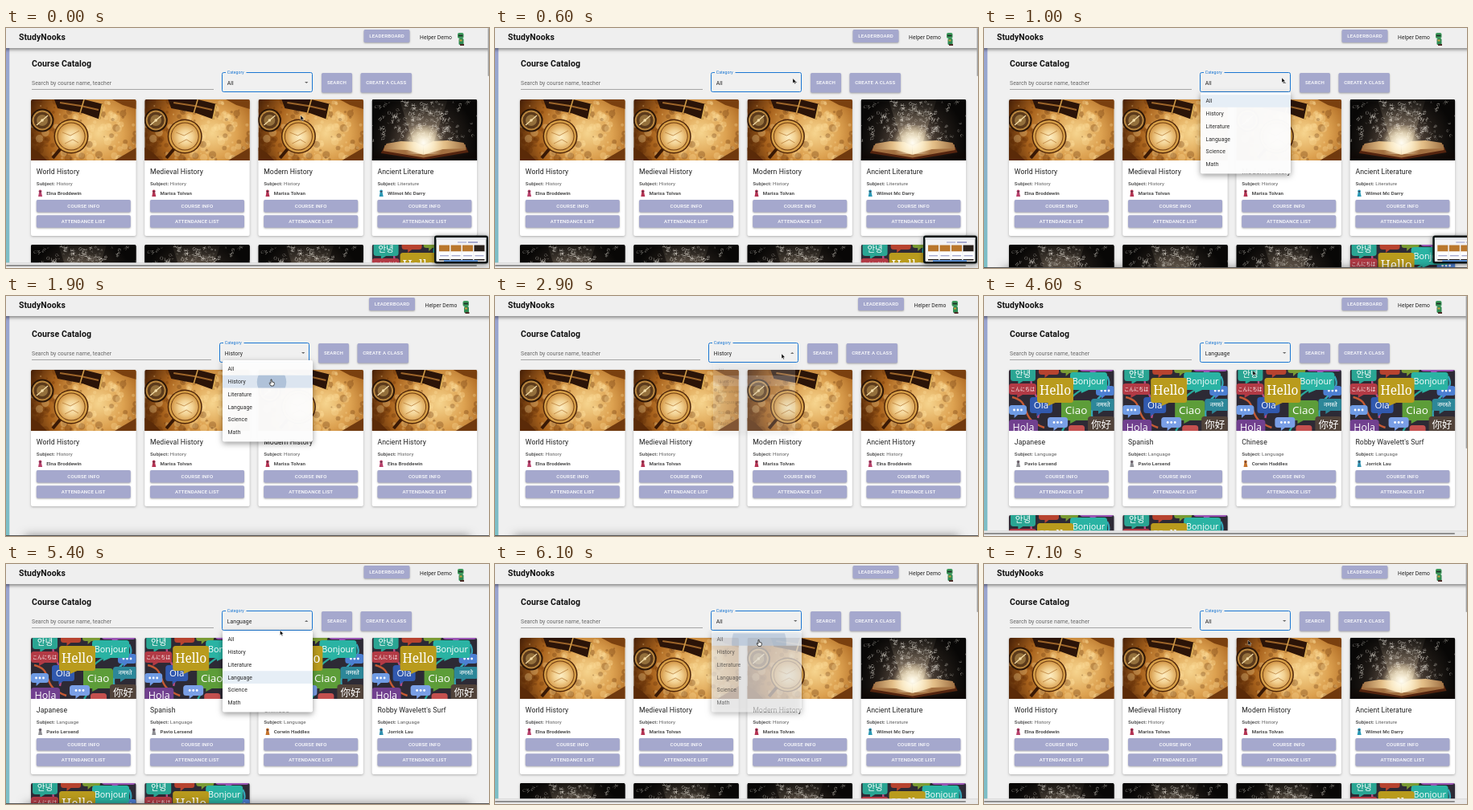
Recreate the animation shown at these times as an HTML page with a canvas. Size 600 by 299 pixels, loop 7200 ms.

```html
<!DOCTYPE html>
<html lang="en">
<head>
<meta charset="utf-8">
<title>Course Catalog</title>
<style>
  html, body { margin: 0; width: 600px; height: 299px; overflow: hidden; background: #f0f0f0; }
  canvas { display: block; width: 600px; height: 299px; }
</style>
</head>
<body>
<canvas id="stage"></canvas>
<script>
const LOOP = 7200, W = 600, H = 299;
const BLUE = '#1976d2', LILAC = '#a5a8cd', PAGE = '#f0f0f0';
const canvas = document.getElementById('stage');
const dpr = window.devicePixelRatio || 1;
canvas.width = W * dpr;
canvas.height = H * dpr;
const c = canvas.getContext('2d');

const CATEGORIES = ['All', 'History', 'Literature', 'Language', 'Science', 'Math'];
const elna = ['Elna Broddewin', '#b8406a'], marisa = ['Marisa Tolvan', '#b43252'];
const wilmot = ['Wilmot Mc Darry', '#2a98b4'], pavio = ['Pavio Lersend', '#8d8d92'];
const corwin = ['Corwin Haddles', '#c4722c'], jorrick = ['Jorrick Lau', '#2f8fae'];
const historyRow = [['World History', 'History', elna], ['Medieval History', 'History', marisa],
  ['Modern History', 'History', marisa]];
const COURSES = {
  All: [...historyRow, ['Ancient Literature', 'Literature', wilmot],
    ['', 'Literature'], ['', 'Literature'], ['', 'Literature'], ['', 'Language']],
  History: [...historyRow, ['Ancient History', 'History', elna]],
  Language: [['Japanese', 'Language', pavio], ['Spanish', 'Language', pavio],
    ['Chinese', 'Language', corwin], ["Robby Wavelett's Surf", 'Language', jorrick],
    ['', 'Language'], ['', 'Language']]
};
const MENUS = [
  { open: 755, click: 1850, x: 269, y: 80 },
  { open: 2800, click: 3800, x: 266, y: 83 },
  { open: 4950, click: 5985, x: 269, y: 83 }
];
// time, x, y
const POINTER = [[0, 366, 109], [650, 370, 62], [1050, 370, 62], [1600, 330, 107], [2150, 330, 107],
  [2700, 356, 72], [3000, 356, 72], [3600, 329, 141], [4000, 329, 141], [4600, 334, 93],
  [4850, 350, 71], [5150, 350, 71], [5700, 328, 98], [7200, 328, 95]];

const clamp = v => Math.max(0, Math.min(1, v));
const hash = n => { const v = Math.sin(n * 127.1) * 43758.5453; return v - Math.floor(v); };

function text(s, x, y, size, { color = '#222', weight = 400, align = 'left', space = .01, font = 'Roboto, sans-serif' } = {}) {
  c.font = `${weight} ${size}px ${font}`;
  c.letterSpacing = space * size + 'px';
  c.textAlign = align;
  c.fillStyle = color;
  c.fillText(s, x, y + size * .36);
  return c.measureText(s).width;
}
function rect(x, y, w, h, fill, r = 0) {
  c.fillStyle = fill;
  c.beginPath();
  c.roundRect(x, y, w, h, r);
  c.fill();
}
function disc(x, y, r, fill) {
  c.fillStyle = fill;
  c.beginPath();
  c.arc(x, y, r, 0, 7);
  c.fill();
}
function line(points, color, width) {
  c.strokeStyle = color;
  c.lineWidth = width;
  c.beginPath();
  points.forEach(p => c.lineTo(...p));
  c.stroke();
}
function poly(points, fill) {
  c.fillStyle = fill;
  c.beginPath();
  points.forEach(p => c.lineTo(...p));
  c.fill();
}
function shaded(blur, dy, alpha, draw) {
  c.save();
  c.shadowColor = `rgba(0,0,0,${alpha})`;
  c.shadowBlur = blur * dpr;
  c.shadowOffsetY = dy * dpr;
  draw();
  c.restore();
}
function glow(x, y, r, ...colors) {
  const g = c.createRadialGradient(x, y, 0, x, y, r);
  colors.forEach((color, i) => g.addColorStop(i / (colors.length - 1), color));
  return g;
}
function fade(y0, y1, a, b) {
  const g = c.createLinearGradient(0, y0, 0, y1);
  g.addColorStop(0, a);
  g.addColorStop(1, b);
  return g;
}
function button(label, x, y, w, h) {
  shaded(2, 1, .3, () => rect(x, y, w, h, LILAC, 1.7));
  text(label, x + w / 2, y + h / 2, 6.1, { color: '#fff', weight: 500, align: 'center', space: .025 });
}

const PICTURES = {
  History() {
    rect(0, 0, 131, 76, glow(84, 42, 92, '#f6d48e', '#dda251', '#a8621c', '#4a2207'));
    c.globalAlpha = .28;
    for (let i = 0; i < 190; i++) {
      const x = hash(i) * 131, y = hash(i + 260) * 76;
      const edge = Math.hypot((x - 84) / 84, (y - 42) / 50);
      disc(x, y, 1 + hash(i + 520) * 4, hash(i + 780) < edge * .75 ? '#5a2907' : '#ffe0a0');
    }
    c.globalAlpha = 1;
    poly([[0, 60], [10, 66], [20, 76], [0, 76]], '#5a2a08');
    poly([[101, 0], [131, 0], [131, 12], [114, 7]], '#7a400f');
    poly([[131, 60], [131, 76], [104, 76]], '#70390e');

    poly([[29, 0], [66, 0], [90, 6], [86, 25], [64, 17], [33, 11]], '#2b1408');
    line([[36, 4], [62, 8], [84, 13]], '#9c642a', 2);
    line([[66, 0], [61, 17]], '#cf9a48', 1.6);
    line([[89, 6], [85, 25]], '#d9a954', 2.4);

    disc(14, 26, 14.5, '#2b1506');
    disc(14, 26, 12.5, '#b8863f');
    disc(14, 26, 10.5, '#5b3a1b');
    disc(14, 26, 7, '#94703c');
    line([[7, 32], [21, 20]], '#f3dba6', 1.3);
    disc(14, 26, 1.8, '#f3dba6');

    line([[37, 61], [27, 73]], '#381805', 4);
    disc(50, 46, 21.5, '#4d2408');
    disc(50, 46, 20, '#d8a048');
    disc(50, 46, 17.5, '#6e3b10');
    disc(50, 46, 16.6, glow(51, 47, 17, '#fdeec4', '#f3d293', '#d69c4c'));
    line([[39, 41], [49, 45], [60, 39]], '#b97f3b', .8);
    line([[42, 55], [52, 50], [59, 54]], '#b97f3b', .8);
  },
  Literature() {
    rect(0, 0, 131, 76, '#080706');
    rect(0, 0, 131, 76, glow(64, 54, 66, '#d9c19a', '#51443a', '#1e1915', '#080706'));
    poly([[52, 56], [34, 0], [94, 0], [76, 56]], fade(0, 56, 'rgba(200,185,160,.04)', 'rgba(255,235,200,.4)'));
    for (let i = 0; i < 230; i++) {
      const y = 2 + hash(i + 250) * 50, spread = .4 + hash(i + 500) * .6;
      c.save();
      c.translate(65 + (hash(i) - .5) * 140 * spread, y);
      c.rotate(hash(i + 750) * 6);
      c.globalAlpha = .3 + hash(i + 1000) * .6;
      text(String.fromCharCode(65 + i % 26), 0, 0, 3 + hash(i + 1250) * 3.5,
        { color: '#fbf6ec', align: 'center', font: 'Liberation Serif, serif' });
      c.restore();
    }
    rect(0, 62, 131, 14, fade(62, 76, 'rgba(20,10,5,.1)', '#0c0604'));
    poly([[15, 60], [64, 70], [117, 59], [120, 66], [65, 75], [11, 67]], '#54240f');
    poly([[16, 57], [40, 59], [64, 68], [90, 58], [116, 56], [117, 63], [64, 72.5], [14, 64]], '#a26f40');
    poly([[18, 55], [36, 52], [54, 53], [64, 58], [64, 69], [44, 63], [15, 62]], glow(64, 58, 50, '#fff3d4', '#e2bd86', '#9a6c40'));
    poly([[114, 54], [94, 51], [76, 52], [64, 58], [64, 69], [88, 62], [117, 61]], glow(64, 58, 54, '#fff3d4', '#e2bd86', '#9a6c40'));
    rect(36, 32, 56, 36, glow(64, 54, 25, '#fffdf4', 'rgba(255,244,214,.6)', 'rgba(255,230,180,0)'));
  },
  Language() {
    rect(0, 0, 131, 76, '#2d2a35');
    c.lineWidth = 2.4;
    [['#2aa79b', 92, 24, 60, 40, 80, 60, 66, 76], ['#b24c86', 30, 0, 20, 30, 44, 28, 36, 60],
      ['#35a5b8', 122, 8, 134, 30, 96, 32, 104, 62], ['#c55a34', 4, 34, 30, 40, 10, 60, 44, 72]].forEach(([color, x, y, ...rest]) => {
      c.strokeStyle = color;
      c.beginPath();
      c.moveTo(x, y);
      c.bezierCurveTo(...rest);
      c.stroke();
    });
    const cjk = 'Noto Sans CJK JP, Noto Sans CJK, sans-serif', sans = 'Open Sans, sans-serif';
    const bubble = (x, y, w, h, fill, word, size, font = sans) => {
      rect(x, y, w, h, fill, 3.5);
      poly([[x + w * .3, y + h - 1], [x + w * .55, y + h - 1], [x + w * .3, y + h + 4]], fill);
      if (word) text(word, x + w / 2, y + h / 2, size, { color: '#fff', align: 'center', space: 0, font });
      else for (let i = -1; i < 2; i++) disc(x + w / 2 + i * 4.5, y + h / 2, 1.4, '#fff');
    };
    bubble(37, -7, 25, 13, '#b7432f', ' ', 5);
    bubble(64, -8, 22, 12, '#7a9b34', ' ', 5);
    bubble(88, -9, 42, 11, '#9a56b4', ' ', 5);
    bubble(2, -3, 31, 17, '#2aa593', '안녕', 10.5, cjk);
    bubble(0, 17, 34, 14, '#b23a45', 'こんにちは', 6, cjk);
    bubble(108, 20, 23, 12, '#4c7fd2');
    bubble(102, 36, 30, 15, '#2d8799', 'नमस्ते', 8, 'Noto Sans Devanagari, Noto Sans, sans-serif');
    bubble(26, 34, 28, 20, '#3159ae', 'Olá', 11.5);
    bubble(0, 44, 22, 12, '#6f9be4');
    bubble(76, 3, 46, 22, '#2ab3a3', 'Bonjour', 10.8);
    bubble(65, 38, 37, 25, '#5d9d39', 'Ciao', 13.5);
    bubble(35, 10, 45, 31, '#b99b1d', 'Hello', 15.5, 'Noto Serif, serif');
    bubble(48, 59, 25, 13, '#7a9fe6');
    bubble(74, 69, 20, 12, '#c4504f', ' ', 5);
    bubble(0, 62, 36, 19, '#71408f', 'Hola', 12.5);
    bubble(98, 58, 33, 21, '#51433a', '你好', 12.5, cjk);
  }
};

function figure(x, y, color) {
  poly([[x - 2.4, y + 4.5], [x - 1.5, y - .5], [x + 1.5, y - .5], [x + 2.6, y + 4.5]], color);
  disc(x, y - 2, 1.9, color);
  rect(x - .9, y - 2.4, 1.9, 1.4, '#4a3040');
}

function card([title, subject, tutor], x, y) {
  shaded(3, 1, .28, () => rect(x, y, 130.5, 170, '#fff', 2));
  c.save();
  c.beginPath();
  c.roundRect(x, y, 130.5, 76, [2, 2, 0, 0]);
  c.clip();
  c.translate(x, y);
  PICTURES[subject]();
  c.restore();
  if (!tutor) return;
  const left = x + 6.8, grey = '#5c5c5c';
  text(title, left, y + 90, 8.7);
  const w = text('Subject: ', left, y + 104.3, 6.2, { weight: 700, color: grey });
  text(subject, left + w, y + 104.3, 6.2, { color: grey });
  figure(x + 11.5, y + 116.5, tutor[1]);
  text(tutor[0], x + 19.3, y + 116.7, 6.15, { weight: 700, color: '#4c4c4c' });
  button('COURSE INFO', x + 6.8, y + 125, 117, 15.5);
  button('ATTENDANCE LIST', x + 6.8, y + 144.3, 117, 15.5);
}

function toolbar(category, open, wide, y) {
  const x = wide ? 266 : 269, w = wide ? 111 : 112, shift = wide ? -4 : 0;
  text('Course Catalog', 32, y + 47.5, 10.5, { weight: 700, color: '#111' });
  text('Search by course name, teacher', 32, y + 72, 6.85, { color: '#666' });
  rect(32, y + 79, (wide ? 255 : 258) - 32, .7, '#8c8c8c');
  c.strokeStyle = BLUE;
  c.lineWidth = 1;
  c.beginPath();
  c.roundRect(x - .5, y + 58.5, w, 24, 2);
  c.stroke();
  rect(x + 4, y + 57, 25.5, 3, PAGE);
  text('Category', x + 5.8, y + 58.5, 5.15, { color: BLUE });
  text(category, x + 5.8, y + 71.2, 6.85);
  const ax = x + w - 7.8, ay = y + 71, d = open ? -1.1 : 1.1;
  poly([[ax - 2.2, ay - d], [ax + 2.2, ay - d], [ax, ay + d]], '#666');
  button('SEARCH', 392 + shift, y + 59, 38, 24.5);
  button('CREATE A CLASS', 440.5 + shift, y + 59, 63.5, 24.5);
}

function header(wide) {
  const shift = wide ? 6.5 : 0;
  shaded(4, 1.5, .45, () => rect(-9, -9, 618, 34, '#efefef'));
  text('StudyNooks', 16, 11.5, 10.4, { weight: 700, color: '#111' });
  button('LEADERBOARD', 444.5 + shift, 2, 57, 16);
  text('Helper Demo', 514 + shift, 11.5, 6.75);
  const x = 565 + shift;
  rect(x - 2.5, 13, 6, 8, '#2f8a52', 1.5);
  rect(x - 4, 6, 7.5, 7, '#3d9a5c', 2);
  rect(x - 3, 8.5, 5.5, 2, '#20352a');
  rect(x - 1.5, 14.5, 3, 2, '#c9a03d');
  rect(x - 1, 20, 5, 2, '#4b2b26');
}

function scrollbars(category) {
  rect(0, 292.5, W, 6.5, '#e9e9e9');
  rect(0, 292.5, W, .7, '#cfcfcf');
  rect(0, 295, 585, 2, '#8f8f8f', 1);
  rect(598.6, 0, 1.4, category === 'All' ? 60 : 190, '#a0a0a0', .7);
}

function bottomShade() {
  c.save();
  c.beginPath();
  c.rect(0, 270, W, 29);
  c.clip();
  shaded(12, 0, .4, () => rect(24, 298, 552, 20, '#777'));
  c.restore();
  rect(0, 297.9, W, 1.1, '#555');
}

function menuAlpha(m, t) {
  if (t < m.open) return 0;
  const leaving = t - m.click - 45;
  return leaving > 0 ? 1 - clamp(leaving / 200) : clamp((t - m.open) / 250) ** 2;
}

function drawMenu(m, t, category, pointer) {
  const leave = clamp((t - m.click - 110) / 135);
  const grow = (1 - (1 - clamp((t - m.open) / 250)) ** 2) * (1 - leave * leave);
  const rowH = 15.7, rowY = i => m.y + 11 + rowH * (i - .5);
  c.save();
  c.globalAlpha = menuAlpha(m, t);
  c.translate(m.x + 56, m.y);
  c.scale(.75 + .25 * grow, .5625 + .4375 * grow);
  c.translate(-m.x - 56, -m.y);
  shaded(7, 2.5, .4, () => rect(m.x, m.y, 112, 101.5, '#fff', 2));
  CATEGORIES.forEach((name, i) => {
    const hovered = Math.abs(pointer.y - rowY(i + .5)) < rowH / 2;
    if (name === category) rect(m.x, rowY(i), 112, rowH, hovered ? '#dbe5f0' : '#e6eef6');
    else if (hovered) rect(m.x, rowY(i), 112, rowH, '#f3f3f3');
    if (hovered && t > m.click) {
      c.save();
      c.beginPath();
      c.rect(m.x, rowY(i), 112, rowH);
      c.clip();
      disc(pointer.x, pointer.y, 6 + (t - m.click) * .24, 'rgba(70,110,160,.3)');
      c.restore();
    }
    text(name, m.x + 6.5, rowY(i + .5), 6.85);
  });
  c.restore();
}

function thumbnail(t) {
  const x = 532 + 25 * (Math.max(0, t - 850) / 150) ** 2;
  if (x > 610) return;
  shaded(6, 1, .5, () => rect(x, 258.5, 67, 35, '#0b1414', 3));
  rect(x + 2.5, 261, 62, 30, '#f3f3f5', 1);
  rect(x + 2.5, 261, 62, 2.5, '#dcdee2');
  rect(x + 29, 266, 11, 2, '#c3c6e0');
  rect(x + 42, 266, 12, 2, LILAC);
  for (let i = 0; i < 4; i++) {
    const left = x + 6 + i * 14.5;
    rect(left, 270.5, 13, 8, i < 3 ? '#b9772d' : '#2a211b');
    rect(left, 278.5, 13, 8, '#fff');
    rect(left + 1, 283, 11, 1.4, LILAC);
    rect(left, 288, 13, 1.5, '#26211f');
  }
  rect(x + 12, 289, 42, 2, '#5d8fd0');
}

function pointerAt(t) {
  const i = POINTER.findIndex(p => p[0] > t), [t0, x0, y0] = POINTER[i - 1], [t1, x1, y1] = POINTER[i];
  const p = (t - t0) / (t1 - t0), e = p * p * (3 - 2 * p);
  return { x: x0 + (x1 - x0) * e, y: y0 + (y1 - y0) * e };
}
function drawPointer({ x, y }, hand) {
  c.save();
  c.translate(x, y);
  c.strokeStyle = hand ? '#222' : '#fff';
  c.lineWidth = hand ? .8 : .4;
  poly(hand
    ? [[-1, -3], [0, -3], [.4, 0], [3, .5], [3.4, 2.5], [2.4, 5], [-1, 5], [-3, 1.5], [-2.4, 1], [-1, 2]]
    : [[0, 0], [0, 6], [1.4, 4.8], [2.4, 7], [3.3, 6.6], [2.4, 4.4], [4.2, 4.3]], hand ? '#fff' : '#000');
  c.closePath();
  c.stroke();
  c.restore();
}

function draw(t) {
  const [first, second, third] = MENUS;
  const category = t < first.click ? 'All' : t < second.click ? 'History' : t < third.click ? 'Language' : 'All';
  const wide = category === 'History', top = t < first.click ? -3 : 0;
  const open = MENUS.some(m => t >= m.open && t < m.click);
  const menu = MENUS.find(m => menuAlpha(m, t) > 0);
  const pointer = pointerAt(t);

  c.setTransform(dpr, 0, 0, dpr, 0, 0);
  rect(0, 0, W, H, PAGE);
  rect(0, 25, 4.3, 274, fade(25, 299, '#9ca4d0', '#7cc0c6'));
  toolbar(category, open, wide, top);
  COURSES[category].forEach((course, i) =>
    card(course, 31 + i % 4 * 141.2, top + 92 + Math.floor(i / 4) * 181));
  header(wide);
  if (wide || open) bottomShade();
  else scrollbars(category);
  if (menu) drawMenu(menu, t, category, pointer);
  thumbnail(t);
  drawPointer(pointer, menu && pointer.y > menu.y);
}

function tick() {
  draw(performance.now() % LOOP);
  requestAnimationFrame(tick);
}
tick();
</script>
</body>
</html>
```
